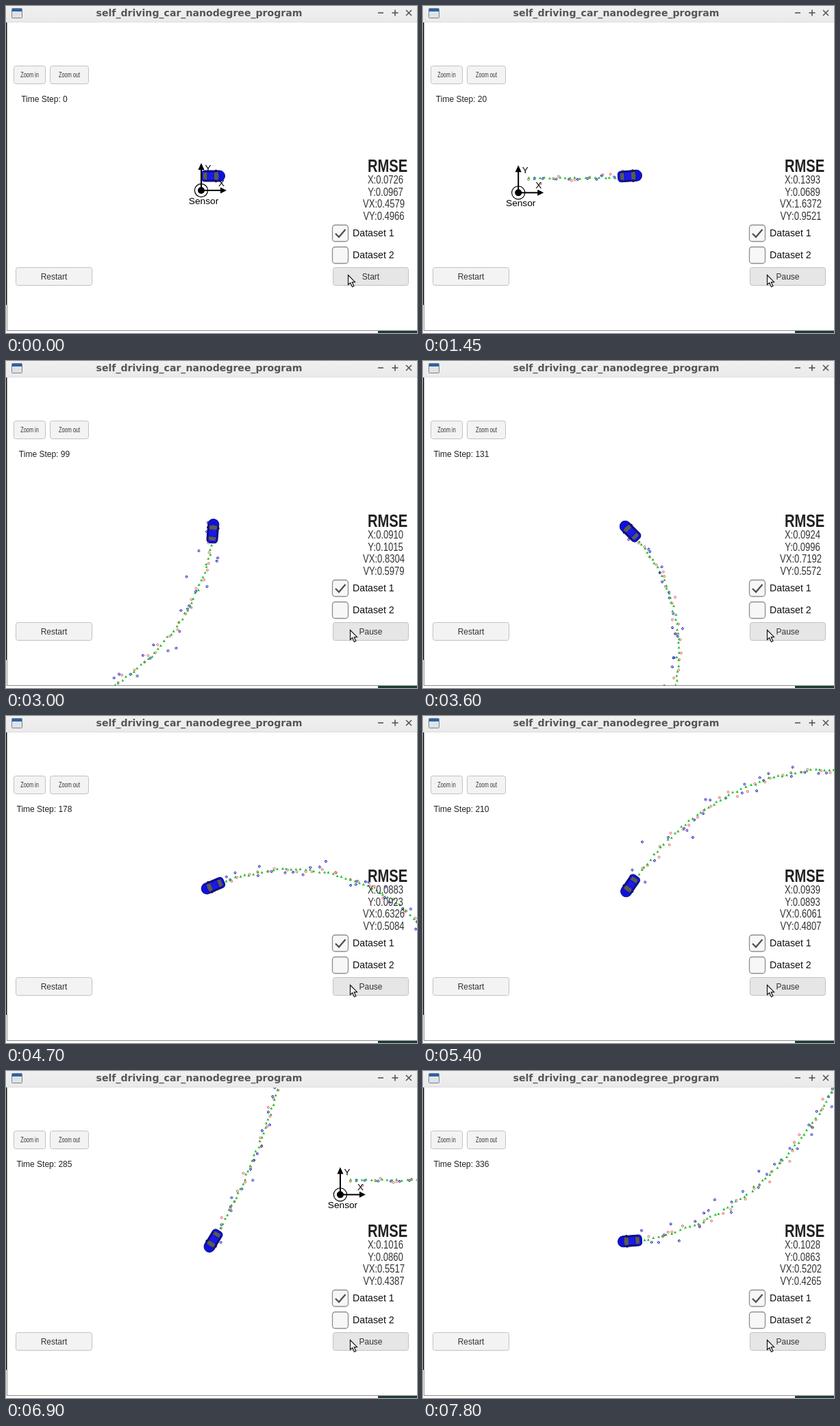
An HTML page with a canvas for the animation above (8 s loop, 600x477 px).

```html
<!DOCTYPE html>
<html lang="en">
<head>
<meta charset="utf-8">
<title>self_driving_car_nanodegree_program</title>
<style>
html, body { margin: 0; width: 600px; height: 477px; overflow: hidden; background: #fff; }
canvas { display: block; }
</style>
</head>
<body>
<canvas id="stage" width="600" height="477"></canvas>
<script>
const ctx = document.getElementById('stage').getContext('2d');
const SANS = '"Liberation Sans", Arial, sans-serif';
const LOOP = 8000;
const TICK = 50;
const BEGIN = 1050;
const CAR = { x: 302, y: 248 };
const LAST_STEP = 336;

// The screen freezes during these spans (ms)
const STALLS = [[1550, 1750], [4150, 4300], [4700, 4850], [4850, 5000],
  [6000, 6350], [6450, 6600], [7350, 7500], [7550, 7700], [7800, 8000]];

// Key moments: time, step and RMSE readout
const KEYS = [
  { t: 0, step: 0, rmse: [0.0726, 0.0967, 0.4579, 0.4966] },
  { t: 1450, step: 20, rmse: [0.1393, 0.0689, 1.6372, 0.9521] },
  { t: 2350, step: 64, rmse: [0.0894, 0.1035, 0.9509, 0.6420] },
  { t: 3600, step: 131, rmse: [0.0924, 0.0996, 0.7192, 0.5572] },
  { t: 4700, step: 178, rmse: [0.0883, 0.0923, 0.6326, 0.5084] },
  { t: 6000, step: 248, rmse: [0.1007, 0.0858, 0.5742, 0.4475] },
  { t: 7800, step: LAST_STEP, rmse: [0.1028, 0.0863, 0.5202, 0.4265] }
];

// Running time, in whole ticks, without the frozen spans
function activeTime(t) {
  let time = Math.max(0, Math.floor(t / TICK) * TICK - BEGIN);
  for (const [from, to] of STALLS)
    time -= Math.max(0, Math.min(Math.floor(t / TICK) * TICK, to - TICK) - from);
  return time;
}

function stateAt(t) {
  const time = activeTime(t);
  let i = 0;
  while (i < KEYS.length - 2 && time >= activeTime(KEYS[i + 1].t)) i++;
  const a = KEYS[i], b = KEYS[i + 1], start = activeTime(a.t);
  const u = (time - start) / (activeTime(b.t) - start);
  const mix = (p, q) => p + (q - p) * u;
  return {
    running: time > 0,
    step: Math.round(mix(a.step, b.step)),
    rmse: a.rmse.map((v, k) => mix(v, b.rmse[k]))
  };
}

// Figure eight: yaw rate 0.55 sin(phase), speed 5 + 0.2 cos(2 phase), 25 s per lap
const DT = 0.05, LAP = 25, SCALE = 28.1;
const phase = s => 2 * Math.PI * s * DT / LAP;
const heading = s => 0.55 * LAP / (2 * Math.PI) * (1 - Math.cos(phase(s)));

const route = [{ x: 17, y: -21 }];
for (let s = 0; s < LAST_STEP; s++) {
  const d = (5 + 0.2 * Math.cos(2 * phase(s + 0.5))) * DT * SCALE;
  const a = heading(s + 0.5), p = route[s];
  route.push({ x: p.x + d * Math.cos(a), y: p.y - d * Math.sin(a) });
}

let seed = 71;
function random() {
  seed = (seed * 16807) % 2147483647;
  return seed / 2147483647;
}
const gauss = () => Math.sqrt(-2 * Math.log(random())) * Math.cos(2 * Math.PI * random());

// One estimate per step; lidar and radar readings take turns
const marks = route.map((p, s) => {
  const est = { x: p.x + gauss() * 0.9, y: p.y + gauss() * 0.9 };
  if (s % 2 === 0) return { est, x: p.x + gauss() * 3.6, y: p.y + gauss() * 3.6 };
  const dist = Math.hypot(p.x, p.y) + gauss() * 6;
  const angle = Math.atan2(p.y, p.x) + gauss() * 0.022;
  return { est, x: dist * Math.cos(angle), y: dist * Math.sin(angle), dir: random() * 6.28 };
});

function poly(points, fill) {
  ctx.beginPath();
  points.forEach(([x, y]) => ctx.lineTo(x, y));
  ctx.closePath();
  ctx.fillStyle = fill;
  ctx.fill();
}

function line(points, color, width) {
  ctx.beginPath();
  points.forEach(([x, y]) => ctx.lineTo(x, y));
  ctx.strokeStyle = color;
  ctx.lineWidth = width;
  ctx.stroke();
}

function box(x, y, w, h, r, fill, stroke, width = 1) {
  ctx.beginPath();
  ctx.roundRect(x, y, w, h, r);
  ctx.fillStyle = fill;
  ctx.fill();
  if (!stroke) return;
  ctx.strokeStyle = stroke;
  ctx.lineWidth = width;
  ctx.stroke();
}

function ring(x, y, r, color, width) {
  ctx.beginPath();
  ctx.arc(x, y, r, 0, 7);
  ctx.strokeStyle = color;
  ctx.lineWidth = width;
  ctx.stroke();
}

function text(str, x, y, size, { color = '#222', weight = '', align = 'center', narrow = 1, font = SANS } = {}) {
  ctx.save();
  ctx.translate(x, y);
  ctx.scale(narrow, 1);
  ctx.font = `${weight} ${size}px ${font}`;
  ctx.textAlign = align;
  ctx.fillStyle = color;
  ctx.fillText(str, 0, 0);
  ctx.restore();
}

function drawMark({ est, x, y, dir }) {
  if (dir === undefined) {
    ring(x, y, 1.5, '#e4474c', 0.9);
  } else {
    ring(x, y, 1.5, '#2626c0', 1);
    line([[x, y], [x + 2.2 * Math.cos(dir), y + 2.2 * Math.sin(dir)]], '#2626c0', 0.8);
  }
  poly([[est.x, est.y - 2], [est.x + 2, est.y + 1.6], [est.x - 2, est.y + 1.6]], '#22c02c');
}

function drawSensor() {
  line([[0, 0], [0, -32]], '#000', 2);
  line([[0, 0], [30, 0]], '#000', 2);
  poly([[0, -40], [4.5, -30], [-4.5, -30]], '#000');
  poly([[37, 0], [28, -4.5], [28, 4.5]], '#000');
  ring(0, 0, 9.6, '#000', 1.2);
  ctx.beginPath();
  ctx.arc(0, 0, 5, 0, 7);
  ctx.fillStyle = '#000';
  ctx.fill();
  text('Y', 10, -28, 13.5, { color: '#000' });
  text('X', 29.5, -6, 13.5, { color: '#000' });
  text('Sensor', 3.5, 19.8, 13.7, { color: '#000' });
}

function drawCar(angle) {
  ctx.save();
  ctx.translate(CAR.x, CAR.y);
  ctx.rotate(-angle);
  box(3, -9.3, 3, 18.6, 1, '#15155c');
  box(-17.5, -8, 35, 16, [5, 8, 8, 5], '#1010dc', '#0c0c84');
  for (const y of [-6.6, 6.6]) line([[-12, y], [9, y]], '#15154a', 1.4);
  poly([[-14, -4.5], [-8.5, -5.5], [-8.5, 5.5], [-14, 4.5]], '#5b5b50');
  poly([[2, -5], [7.5, -6], [8.5, 0], [7.5, 6], [2, 5]], '#5b5b50');
  box(-7, -5, 8.5, 10, 1, '#1a1ae6');
  ctx.restore();
}

function drawWorld(step) {
  const p = route[step];
  const follow = () => ctx.translate(CAR.x - p.x, CAR.y - p.y);
  ctx.save();
  ctx.beginPath();
  ctx.rect(2, 24, 598, 449);
  ctx.clip();
  ctx.save();
  follow();
  if (step > 0) marks.slice(0, step + 1).forEach(drawMark);
  ctx.restore();
  drawCar(heading(step));
  follow();
  drawSensor();
  ctx.restore();
}

function drawWindow() {
  const bar = ctx.createLinearGradient(0, 0, 0, 23);
  bar.addColorStop(0, '#f0f0f0');
  bar.addColorStop(1, '#eaeaea');
  ctx.fillStyle = bar;
  ctx.fillRect(0, 0, 600, 23);
  ctx.fillStyle = '#dedede';
  ctx.fillRect(0, 23, 600, 1);
  text('self_driving_car_nanodegree_program', 282, 15, 14.1,
    { color: '#555', weight: 'bold', font: '"DejaVu Sans", sans-serif' });
  box(8.5, 3.5, 15, 14, 1, '#dfe3e6', '#78828c');
  ctx.fillStyle = '#2a62a8';
  ctx.fillRect(9, 4, 14, 4);
  line([[543, 10], [551, 10]], '#555', 1.6);
  line([[563.5, 10], [572.5, 10]], '#555', 1.6);
  line([[568, 5.5], [568, 14.5]], '#555', 1.6);
  line([[584, 6], [592, 14]], '#555', 1.6);
  line([[592, 6], [584, 14]], '#555', 1.6);

  ctx.fillStyle = '#111';
  ctx.fillRect(0, 24, 1, 412);
  ctx.fillStyle = '#8c8c8c';
  ctx.fillRect(1, 24, 1, 450);
  ctx.fillRect(1, 473, 599, 1);
  ctx.fillStyle = '#1f3c38';
  ctx.fillRect(543, 474, 57, 3);
}

function button(label, x, y, w, h, size, fill = '#f3f3f3', narrow = 1) {
  box(x + 0.5, y + 0.5, w - 1, h - 1, 3, fill, '#c2c2c2');
  text(label, x + w / 2, y + h / 2 + size * 0.36, size, { color: '#333', narrow });
}

function checkbox(label, y, checked) {
  box(476.5, y + 0.5, 23, 24, 4, '#f7f7f7', '#8e8e8e', 1.3);
  if (checked) line([[481, y + 13], [486, y + 18], [495.5, y + 7]], '#505050', 2.3);
  text(label, 506, y + 17.3, 14.2, { color: '#111', align: 'left' });
}

function drawPanel({ step, rmse, running }) {
  button('Zoom in', 11, 87, 47, 27, 10, '#f3f3f3', 0.73);
  button('Zoom out', 64, 87, 57, 27, 10, '#f3f3f3', 0.73);
  text('Time Step: ' + step, 56, 140, 12);

  text('RMSE', 557, 241.5, 26, { weight: 'bold', narrow: 0.775 });
  ['X', 'Y', 'VX', 'VY'].forEach((name, i) => {
    const x = name.length > 1 ? 551.5 : 554;
    text(`${name}:${rmse[i].toFixed(4)}`, x, 259 + i * 17.7, 16, { color: '#333', narrow: 0.815 });
  });

  checkbox('Dataset 1', 319, true);
  checkbox('Dataset 2', 351, false);
  button('Restart', 14, 381, 112, 27, 12);
  button(running ? 'Pause' : 'Start', 477, 381, 111, 27, 12, '#e6e6e6');
}

function drawCursor(x, y) {
  ctx.save();
  ctx.translate(x + 0.5, y + 0.5);
  poly([[0, 0], [0, 14], [3.2, 11.2], [6, 17.2], [8.4, 16], [5.7, 10.3], [10, 10.2]], '#fff');
  ctx.strokeStyle = '#111';
  ctx.lineWidth = 1.2;
  ctx.stroke();
  ctx.restore();
}

function draw(now) {
  const t = now % LOOP;
  const state = stateAt(t);
  ctx.fillStyle = '#fff';
  ctx.fillRect(0, 0, 600, 477);
  drawWorld(state.step);
  drawPanel(state);
  drawWindow();
  drawCursor(t < 250 ? 499 : t < 500 ? 500 : 502, 392);
  requestAnimationFrame(draw);
}
requestAnimationFrame(draw);
</script>
</body>
</html>
```
